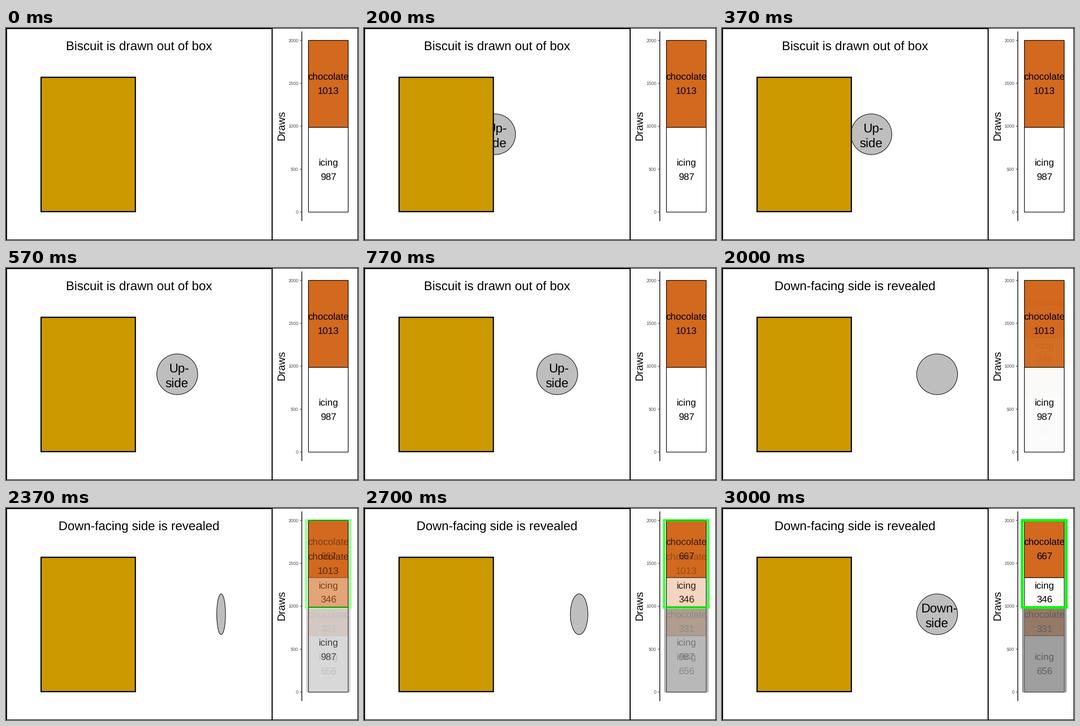
A matplotlib script for the animation above (5000 ms loop, 664x402 px).

```python
import numpy as np
import matplotlib.pyplot as plt
from matplotlib.animation import FuncAnimation
from matplotlib.patches import Ellipse, Rectangle

W, H, DPI = 664, 402, 64
PT = 72 / DPI                 # points per pixel
FRAMES = 150
REVEAL, FLIP_MID, DONE = 60, 75, 90

BLACK, WHITE = np.zeros(3), np.ones(3)
CHOC = np.array([210, 105, 30]) / 255
GREEN = np.array([0, 1, 0])


def shade(color):
    """Colour under the grey veil that dims the lower half."""
    return 0.25 * color + 0.75 * np.full(3, 127 / 255)


plt.rcParams["font.family"] = "Liberation Sans"
plt.rcParams["text.hinting"] = "none"
plt.rcParams["path.snap"] = False

fig = plt.figure(figsize=(W / DPI, H / DPI), dpi=DPI, facecolor="white")
ax = fig.add_axes([0, 0, 1, 1])
ax.set_xlim(0, W)
ax.set_ylim(H, 0)
ax.axis("off")


def label(x, y, s, size, z=5, color="black", ha="center", **kw):
    return ax.text(x, y, s, fontsize=size * PT, color=color, ha=ha,
                   va="baseline", zorder=z, **kw)


def box(x0, y0, x1, y1, fill="none", edge="none", lw=0.0, z=1):
    return ax.add_patch(Rectangle((x0, y0), x1 - x0, y1 - y0, facecolor=fill,
                                  edgecolor=edge, linewidth=lw * PT, zorder=z))


def line(xs, ys, lw, color="black", z=4):
    return ax.plot(xs, ys, color=color, lw=lw * PT, zorder=z,
                   solid_capstyle="butt")[0]


# Panel frames
for rect in [(0, 0, 2, H), (0, 0, 503, 2), (501, 0, 503, H), (503, 0, W, 1),
             (663, 0, W, H), (0, 401, W, H)]:
    box(*rect, fill="black", z=20)

# Left panel
title = label(250.7, 42, "", 23.7)
box(66.2, 93.5, 244, 348.2, fill="#CC9900", edge="black", lw=2.3, z=6)

CX, CY, R = 405.8, 201.5, 38.6
STEP = 200 / 29
disc = ax.add_patch(Ellipse((CX, CY), 2 * R, 2 * R, facecolor="#BEBEBE",
                            edgecolor="black", linewidth=PT, zorder=2))
top_word = label(0, 198.2, "", 23.7, z=3)
low_word = label(0, 226.2, "side", 23.7, z=3)


# Right panel: axis
def level(v):
    return 349.1 - v * 0.1628


line([558, 558], [6.5, 366], 1.4)
for v in range(0, 2001, 500):
    line([554.5, 558], [level(v)] * 2, 1.1, "#333333")
    label(551.6, level(v) + 3, str(v), 8.8, color="#4D4D4D", ha="right")
label(525, 185, "Draws", 20, rotation=90, rotation_mode="anchor")

# Right panel: bar before the reveal
X0, X1, XM = 570.5, 645.5, 608


def bar_text(lo, hi, name, z):
    mid = (level(lo) + level(hi)) / 2
    return [label(XM, mid - 8, name, 18.1, z),
            label(XM, mid + 19, str(hi - lo), 18.1, z)]


for lo, hi, name, fill in [(0, 987, "icing", WHITE),
                           (987, 2000, "chocolate", CHOC)]:
    box(X0, level(hi), X1, level(lo), fill=fill, edge="black", lw=1.2, z=7)
    bar_text(lo, hi, name, 8)

# Bar after the reveal: (artist, colour before, fill beneath, colour after)
fades = []


def fade(artist, after, before=WHITE, under=None):
    fades.append((artist, before, before if under is None else under, after))


Y_DARK, Y_CHOC, Y_TOP, Y_ICE = 191, level(656), 26, level(1333)
GREY = shade(WHITE)
for x0, x1 in [(566, 570), (646, 650)]:
    fade(box(x0, Y_DARK, x1, 349.5, z=9), GREY)
fade(box(571, Y_CHOC, 645, 348.5, z=9), GREY)
fade(box(571, Y_DARK, 645, Y_CHOC, z=9), shade(CHOC))
fade(box(571, Y_ICE, 645, 187, z=9), WHITE, CHOC)
fade(box(571, Y_TOP, 645, Y_ICE, z=9), CHOC, CHOC)

for xs, ys in [([X0, X0], [Y_DARK, 349]), ([X1, X1], [Y_DARK, 349]),
               ([X0, X1], [349.1, 349.1])]:
    fade(line(xs, ys, 1.2, z=10), shade(BLACK), BLACK)
fade(line([571, 645], [Y_CHOC] * 2, 1.2, z=10), shade(BLACK), WHITE, shade(CHOC))
fade(line([571, 645], [Y_ICE] * 2, 1.2, z=10), BLACK, CHOC)

for lo, hi, name, before, under, ink in [
        (0, 656, "icing", WHITE, GREY, shade(BLACK)),
        (656, 987, "chocolate", WHITE, shade(CHOC), shade(BLACK)),
        (987, 1333, "icing", CHOC, WHITE, BLACK),
        (1333, 2000, "chocolate", CHOC, CHOC, BLACK)]:
    for t in bar_text(lo, hi, name, 11):
        fade(t, ink, before, under)

mark = box(566.2, level(2000), 649.5, level(987), lw=5, z=12)


def blend(a, before, under, after):
    """Paint that turns the faded fill into a mix of before and after."""
    base = (1 - a) * before + a * under
    alpha = max(a, np.max(a * (under - after) / np.maximum(base, 1e-6)))
    alpha = min(alpha, 1)
    return np.clip(base + a * (after - under) / alpha, 0, 1), alpha


def draw_fades(a):
    for artist, *colors in fades:
        artist.set_visible(a > 0)
        if a > 0:
            color, alpha = blend(a, *colors)
            artist.set_alpha(alpha)
            if isinstance(artist, Rectangle):
                artist.set_facecolor(color)
            else:
                artist.set_color(color)
    mark.set_visible(a > 0)
    mark.set_edgecolor((*GREEN, a))


def draw(n):
    revealed = n >= REVEAL
    title.set_text("Down-facing side is revealed" if revealed
                   else "Biscuit is drawn out of box")

    x = CX - STEP * max(29 - n, 0)
    if n < REVEAL or n >= DONE:
        width = 1
    elif n < FLIP_MID:
        width = 1 - (n - REVEAL) / 14
    else:
        width = (n - FLIP_MID) / 14
    disc.set_center((x, CY))
    disc.set_width(max(2 * R * width, 0.02))

    show = not revealed or n >= DONE
    top_word.set_text("Down-" if revealed else "Up-")
    top_word.set_x(x + 3.2)
    low_word.set_x(x - 0.5)
    top_word.set_visible(show)
    low_word.set_visible(show)

    draw_fades(min(max((n - REVEAL + 1) / 30, 0), 1))
    return []


anim = FuncAnimation(fig, draw, frames=FRAMES, init_func=lambda: draw(0),
                     interval=5000 / FRAMES, repeat=True, repeat_delay=0,
                     blit=False)
plt.show()
```
